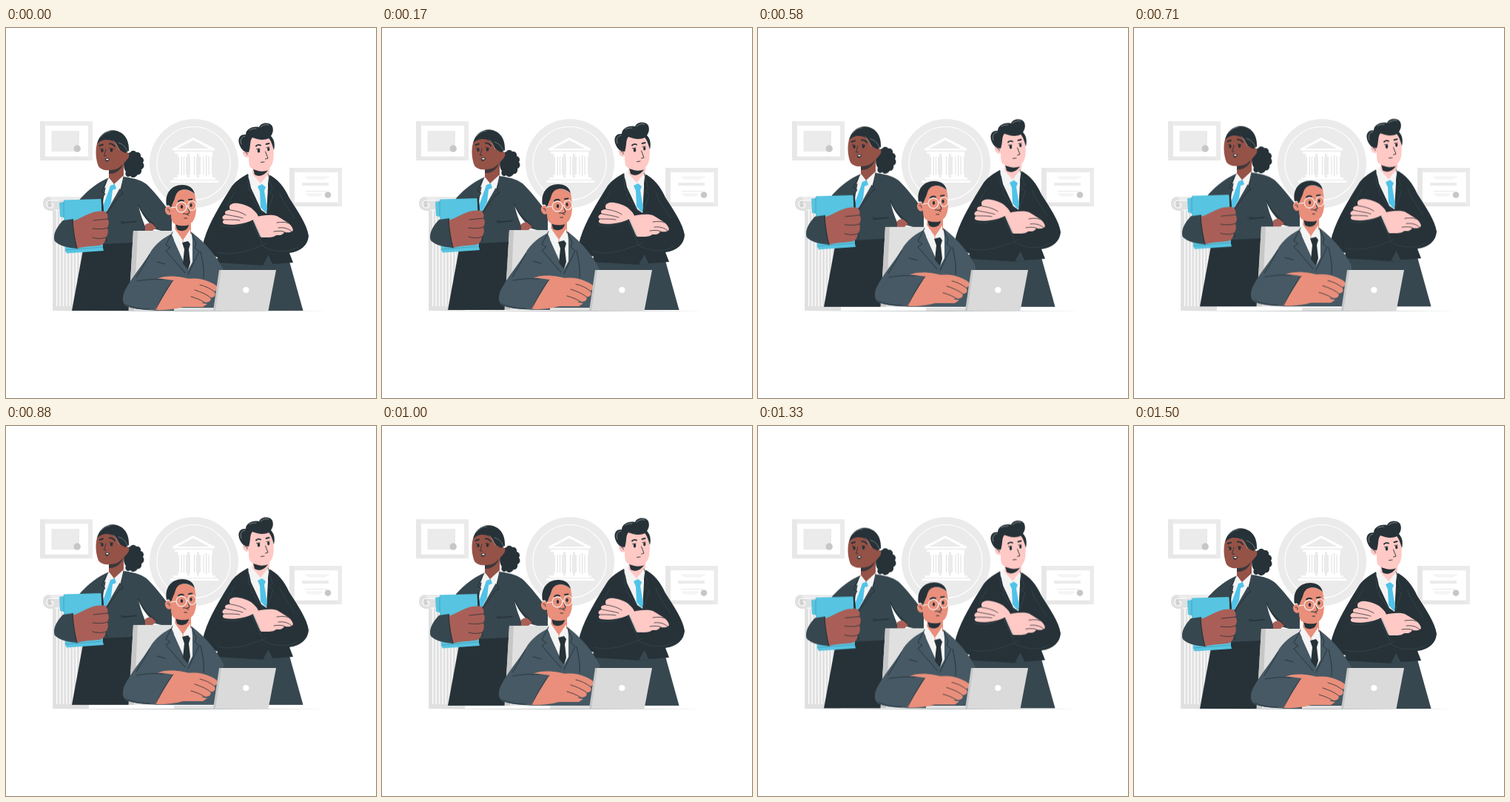
Write an HTML page that moves like this. It is 500x500 px and loops after 1.54 s.

```html
<!DOCTYPE html>
<html lang="en">
<head>
<meta charset="utf-8">
<title>Business team</title>
<style>
  html, body { margin: 0; width: 100%; height: 100%; overflow: hidden; background: #fff; }
  svg { display: block; width: 100vw; height: 100vh; }
  .line { fill: none; stroke-linecap: round; stroke-linejoin: round; }
  .ink { --c: #263238; } .slate { --c: #37474f; } .steel { --c: #465964; }
  .cyan { --c: #57c4e1; } .tie { --c: #50c3e9; } .white { --c: #fff; } .shirt { --c: #f4f4f4; }
  .brown { --c: #955247; } .umber { --c: #a95f57; }
  .pink { --c: #ffc9c5; } .coral { --c: #e98f7b; }
  .g1 { --c: #ebebeb; } .g2 { --c: #e0e0e0; } .g3 { --c: #c7c7c7; }
  svg :not(.line) { fill: var(--c); }
  .line { stroke: var(--c); }
</style>
</head>
<body>
<svg viewBox="0 0 500 500">
  <!-- wall -->
  <g class="g1">
    <path d="M46 126H117V179H46Z"/>
    <path class="g2" d="M46 126H52.500V174H111V179H46Z" opacity=".4"/>
    <path class="white" d="M53 132H111V173.500H53Z"/>
    <path d="M61.500 139H99V167H61.500Z"/>
    <circle class="g3" cx="96.200" cy="163" r="4.700"/>

    <path d="M383 189H454V241H383Z"/>
    <path class="g2" d="M383 189H389.500V236H448V241H383Z" opacity=".4"/>
    <path class="white" d="M390 195H448.500V235.500H390Z"/>
    <path d="M400 209H436V213H400Z"/>
    <path class="line g2" d="M405 201.500H436M408 203.700H432M405 220.500H433M406 224.500H427M408 226.700H425" stroke-width=".7"/>
    <circle class="g3" cx="435" cy="225.500" r="4.300"/>

    <circle cx="254" cy="183" r="60"/>
    <circle class="line white" cx="253.500" cy="183" r="49.500" stroke-width="1.100"/>
    <g class="white">
      <path d="M253 148L282 163V165.500H225V163Z"/>
      <path class="g1" d="M253 151.500L275 163H231Z"/>
      <path d="M228 167H279V170H228ZM226 202H283V205H226ZM222 206H287V209H222Z"/>
      <path d="M232 170H245V174H243V198H245V202H232V198H234V174H232ZM248 170H258V174H257V198H258V202H248V198H249V174H248ZM261 170H279V174H278V198H279V202H261V198H263V174H261Z"/>
      <path class="line g2" d="M237.500 174V198M240.500 174V198M254.500 174V198M267 174V198M270.500 172V200M274 174V198" stroke-width="1"/>
    </g>
  </g>

  <!-- column -->
  <g class="g2">
    <path d="M58 228H112V246H66V382H63V247C54 248 50 243 50 237C50 231 54 228 58 228Z"/>
    <path d="M64 244H112V382H64Z"/>
    <path class="line white" d="M68 311H110" stroke-width="130" style="stroke-linecap:butt" stroke-dasharray="1.600 2.800" opacity=".85"/>
    <path class="g1" d="M58 228H112V233H62Z"/>
    <path class="line white" d="M72 233H60C53 233 53 243 60 243C65 243 65 236 60 237M66 246H112" stroke-width="1.100"/>
    <path class="g3" d="M57 234H61V242H57Z" opacity=".55"/>
    <path d="M63 377H108V382H63Z"/>
  </g>
  <path class="ink" d="M63 382.200L250 382L437 382.300L250 382.600Z" opacity=".7"/>

  <g class="bob">
    <!-- woman -->
    <g class="slate">
      <path class="ink" d="M160 174C163 170 165 169 168 168C170 165 174 165 176 168C180 167 183 171 182 174C186 175 187 179 185 182C188 186 186 190 183 191C184 195 181 199 178 198C175 203 170 203 168 200C163 203 160 198 162 194C158 190 159 180 160 174Z"/>
      <path class="ink" d="M107 284L89 382H166L174 284Z"/>
      <path d="M137 203C124 209 112 218 101 230L78 260C67 272 64 281 66 288C74 295 84 297 96 298L108 293L172 290L190 289L188 266C204 275 218 275 224 275L224 252C213 237 202 223 192 213C186 207 175 203 159 201Z"/>
      <path class="white" d="M179 239C183 250 187 256 194 264L188 268C184 258 181 250 179 239Z"/>
      <path class="umber" d="M188 266C194 261 200 264 204 269L198 274H188Z"/>
      <path class="line ink" d="M179 239C183 250 189 257 199 265L204 270M156 263.500L176 261.500M99 234L91 257" stroke-width="1.300"/>
      <path class="line ink" d="M153 261.500H160" stroke-width=".6"/>

      <path class="shirt" d="M137 203L160 199L157 211L136 248L130 240Z"/>
      <path class="brown" d="M139 187L139 205L146 212L159 201L159 179Z"/>
      <path class="ink" d="M139 189C146 194 154 189 158 183C157 190 149 198 139 197Z" opacity=".8"/>
      <path class="shirt" d="M139 202L133 216L146 211ZM159 199L146 211L155 218Z"/>
      <path class="tie" d="M141 213L147 211L149 217L144 219L142 236L134 251L130 244L139 219Z"/>
      <path class="line ink" d="M138 203L129 221L134 224L129 231L131 250M159 201L155 219L158 224L153 227L135 252C132 262 134 276 136 289" stroke-width="1"/>

      <path class="brown" d="M123 156C120 167 122 180 125 187C130 194 142 193 150 190C157 186 162 180 165 176C168 172 166 167 161 168L157 153L146 147H130Z"/>
      <path class="ink" d="M123 157C125 146 134 138 145 138.300C158 139 167 150 166 166L161 169C158 167 153 166 150 158C147 151 131 147 123 157Z"/>
      <path class="line shirt" d="M145 152C149 155 151 161 153 165M152 155C159 157 162 162 164 166M128 147C132 142 137 140 141 140" stroke-width=".5" opacity=".65"/>
      <g class="ink">
        <ellipse cx="130" cy="165.500" rx="1.700" ry="2.500"/>
        <ellipse cx="142.500" cy="165" rx="1.800" ry="2.600"/>
        <path class="line" d="M126.500 159L131 157.500M140 156.500C143 156 146 158 147 160" stroke-width="1.900"/>
        <path class="line" d="M135 164L132.500 173H135.500" stroke-width=".8"/>
        <path class="line" d="M127 163L130 163.500M140 162.500L145 163.500" stroke-width=".8"/>
        <path d="M134 176.500L140 176C140 180 136 182.500 134 179Z"/>
        <path class="white" d="M135 177L139 176.700L138 178.500L135.500 178.600Z"/>
      </g>

      <path class="cyan" d="M72 236L78 235V232.500L129 231L131 297L132 301L82 304.500L80 301L78 256L73 255Z"/>
      <path class="ink" d="M128.500 231L131 231L132 247H129.500Z"/>
      <path class="line ink" d="M78 235V256M80 300L131 296" stroke-width=".5" opacity=".45"/>
      <path d="M77 260C67 270 63 281 66 288C74 295 84 297 96 298C94 285 92 270 91 258Z"/>
      <path class="umber" d="M90 261C99 258 107 253 115 250C124 247 133 247 135 249C138 252 138 255 137 258C140 262 139 266 137 270C139 276 137 281 135 283C134 290 131 293 126 294C115 295 106 295 96 298C93 286 91 273 90 261Z"/>
      <path class="line ink" d="M118 260C125 259 132 259 137 258M117 271C125 272 132 272 137 270M117 283C123 285 130 285 135 283" stroke-width=".8"/>
      <path class="line ink" d="M90 260C91 274 93 287 96 298" stroke-width="1.100"/>
    </g>

    <!-- standing man -->
    <g class="ink">
      <path class="slate" d="M283 312H382L401.500 382H290Z"/>
      <path d="M327 197C320 201 311 206 305 214C290 238 275 262 268 285C265 294 266 303 272 305C278 308 284 309 286 310L284 317L350 321L355 318L361 319L388 317L383 304C399 302 408 293 409 281C407 266 394 247 383 230C376 215 368 204 353 197Z"/>
      <path class="slate" d="M354.500 307L361 320.500H347Z"/>
      <path class="shirt" d="M327 197L333 192L354 192L354 216L352 251L345 246L331 216Z"/>
      <path class="pink" d="M334 183H357L355 203L343 211L333 198Z"/>
      <path d="M334 190C341 195 350 194 354 192C350 199 342 202 336 198Z"/>
      <path class="shirt" d="M330 194L327 201L335 219L344 210ZM356 195L344 210L353 218Z"/>
      <path class="tie" d="M340 214L346 211L351 215L349 220L353 244L351 250L344 242L343 221Z"/>
      <path class="line slate" d="M327 199L328 219L333 222L330 227L347 250M354 197L360 218L356 222L361 226L353 251M309 222C304 231 301 235 300 239M370 223C374 237 385 248 390 258" stroke-width=".8"/>

      <path class="pink" d="M329 165C325 161 319 164 320 169C321 174 325 176 328 174C328 180 328 185 330 188C336 194 350 194 357 188C363 182 362 169 361 151C350 144 333 145 327 151Z"/>
      <path d="M316 159C312 150 316 143 324 144C324 137 333 132 342 134C345 127 357 127 360 133C362 139 360 143 358 146C362 150 364 156 362 165C360 158 358 152 355 149C347 153 339 150 333 148C329 152 331 160 328 168C322 168 318 164 316 159Z"/>
      <path class="line shirt" d="M318 157C316 151 318 147 323 146M344 134C347 131 351 130 355 131M329 138C332 136 335 136 338 136" stroke-width=".5" opacity=".8"/>
      <ellipse cx="341.500" cy="165.800" rx="1.800" ry="2.700"/>
      <ellipse cx="354.700" cy="163.700" rx="1.600" ry="2.500"/>
      <path class="line" d="M338 159.500C340 157.500 342 157.500 344 158.500M351.500 157L355.500 156" stroke-width="1.900"/>
      <path class="line" d="M338.500 163.500L343 163M352 161.500L356 161M350.500 167L354 176L350.500 177M344.500 181.500L349 181M323 168C325 167 326 169 326 171" stroke-width=".9"/>

      <path class="line slate" d="M286 303C305 309 334 300 352 291M331 259L346 291M292 267C308 272 321 266 331 259M346 294C362 305 385 303 394 296" stroke-width=".8"/>
      <path class="pink" d="M305 238C309 235 323 238 331 243C337 248 340 251 341 255L330 261C320 265 305 267 296 265C292 264 292 261 295 259C290 257 293 253 297 252C294 248 298 246 303 246C301 242 302 239 305 238Z"/>
      <path class="line ink" d="M303 246C312 247 320 250 324 253M297 252C306 254 315 255 320 257M295 259C304 259 311 259 316 260" stroke-width=".8"/>
      <path class="pink" d="M333 256C344 254 357 251 366 254C373 258 377 261 381 263C387 268 390 274 386 275C384 277 379 276 376 276C373 281 368 280 365 280C361 284 351 283 345 283Z"/>
      <path class="line ink" d="M366 263C373 262 378 262 382 264M368 270C375 269 382 271 386 275M362 275C368 274 374 274 377 276" stroke-width=".8"/>
      <path class="line shirt" d="M333 257L344 282" stroke-width=".8"/>
    </g>

    <!-- chair -->
    <path class="g2" d="M172 274H234V382H166Z"/>
    <path class="g3" d="M172 274H178L173 382H165.500Z"/>

    <!-- seated man -->
    <g class="steel">
      <path d="M228 276C213 283 201 292 194 305C184 321 169 338 160 356C156 366 158 373 163 376C174 380 192 381 204 382H290L294 327C286 311 272 292 251 276Z"/>
      <path class="shirt" d="M226 274L231 269L250 268L252 288L252 316L246 327L240 316L227 287Z"/>
      <path class="coral" d="M229 261H250V278L239 289L228 274Z"/>
      <path class="ink" d="M229 264C236 268 242 268 247 266C246 273 238 277 231 272Z"/>
      <path class="shirt" d="M228 271L224 279L231 295L239 287ZM249 272L239 287L249 295Z"/>
      <path class="ink" d="M238 290L246 288L249 292L247 299L249 317L246 327L239 318L241 299Z"/>
      <path class="line ink" d="M225 276L216 293L222 297L216 301L242 331M250 276L257 291L255 297L261 302L246 333M263 302C266 316 268 326 267 338M194 306C188 318 182 328 176 337M204 316L215 319" stroke-width=".9"/>

      <path class="coral" d="M224 244C221 238 214 241 215 247C216 252 220 254 223 252C223 258 224 262 227 264C234 269 246 268 252 262C258 255 258 240 255 224C245 216 230 216 223 226Z"/>
      <path class="ink" d="M217 240C214 223 224 212 238 212C247 212 253 216 255 224C248 218 240 217 234 220C228 224 229 231 226 235L223 243C221 239 219 239 217 240Z"/>
      <g class="ink">
        <ellipse cx="237.500" cy="241.500" rx="1.700" ry="2.500"/>
        <ellipse cx="250" cy="239.500" rx="1.600" ry="2.400"/>
        <path class="line" d="M233 234.500C235 232.500 238 232.500 240 233.500M247 232L251.500 231.500" stroke-width="1.900"/>
        <path class="line" d="M246 243L248 250L244.500 251M239.500 251C242 250 244 252 247 253M241 257L244.500 257M218 245C220 244 221 246 221 248" stroke-width="1"/>
      </g>
      <path class="line shirt" d="M223 243L230 242M244 241L246 240.500" stroke-width="1.100"/>
      <circle class="line shirt" cx="237" cy="242" r="6.900" stroke-width="1.100"/>
      <ellipse class="line shirt" cx="251.300" cy="240" rx="5.500" ry="6.500" stroke-width="1.100"/>
    </g>
  </g>

  <path class="g2" d="M227 378H282V382H227Z"/>

  <g class="bob">
    <path class="steel" d="M266 352L290 345L286 377H262Z"/>
    <path class="coral" d="M204 339C216 333 238 335 253 341L234 349Z"/>
    <path class="steel" d="M176 340C192 337 211 338 226 341L202 381C184 381 168 380 161 374Z"/>
    <path class="coral" d="M226 341C240 339 254 337 266 340C274 342 280 345 284 348C288 352 284 356 281 356C285 361 281 365 276 364C279 370 271 372 267 370C263 374 255 374 249 374C238 378 222 382 201 381Z"/>
    <path class="coral" d="M236 377L252 369L272 373L266 377Z"/>
    <path class="line ink" d="M226 341C218 350 210 366 202 381M262 347C270 349 276 352 281 356M255 354C264 357 271 360 276 364M250 363C257 365 262 367 267 370M177 342C188 340 200 339 212 340M162 374C172 378 183 380 194 380" stroke-width=".8"/>
  </g>

  <!-- laptop -->
  <path class="g3" d="M288 327H294L286 382H280Z"/>
  <path class="g2" d="M291 327H365L354.500 382H283Z" style="--c:#dadada"/>
  <circle class="white" cx="324.300" cy="354" r="4.100"/>
</svg>
<script>
  const rise = 5.7, loop = 1540, lead = 40;
  for (const part of document.querySelectorAll('.bob')) {
    part.animate(
      [{ transform: 'translateY(0)' }, { transform: `translateY(${-rise}px)` }],
      {
        duration: loop / 2, delay: -lead, easing: 'cubic-bezier(.37,0,.63,1)',
        direction: 'alternate', iterations: Infinity
      }
    );
  }
</script>
</body>
</html>
```
